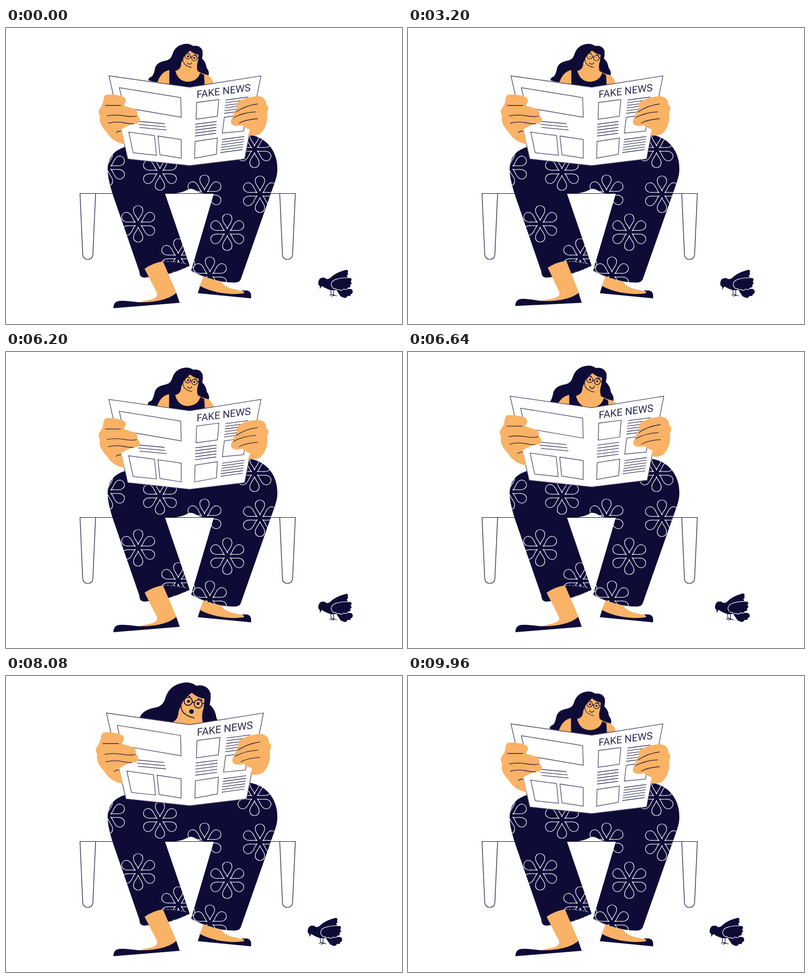
Write an HTML page that moves like this. It is 800 by 600 pixels and loops after 10000 ms.

```html
<!DOCTYPE html>
<html lang="en">
<head>
<meta charset="utf-8">
<title>Reading the paper</title>
<style>
  html, body { margin: 0; width: 100%; height: 100%; overflow: hidden; background: #fff; }
  svg { display: block; width: 800px; height: 600px; }
  .navy { fill: #0e0b37; }
  .skin { fill: #f9b266; }
  .line { fill: none; stroke: #0e0b37; stroke-linecap: round; stroke-linejoin: round; }
  .sheet { fill: #fff; stroke: #4a4768; stroke-width: 1.3; }
  .petal { fill: none; stroke: #fff; stroke-width: 1.2; }
  text { font: 20.5px Roboto, "Liberation Sans", sans-serif; fill: #2b2850; }
</style>
</head>
<body>
<svg viewBox="0 0 800 600">
  <defs>
    <path id="pants" d="M245 240C215 247 204 267 205.500 290C206 305 211 322 215.500 337L269.500 494Q269 505 279 506L300 504C330 500 350 492 371 482L321 335H343Q358 333 366 328Q373 324 381 328Q391 335 402 335H420L374 492C400 506 432 516 461 516Q471 516 474 510L540.500 320C546 305 549 295 548 281C547 250 527 221 490 216L300 225Z"/>
    <clipPath id="cloth"><use href="#pants"/></clipPath>
    <g id="flower"></g>
  </defs>

  <!-- bench -->
  <path class="line" stroke-width="1.2" d="M149.500 335.500H584.500M149.500 335.500L155 459Q156 469 165 469Q175 469 175.500 459L181 335.500M553 335.500L558.500 459Q559 469 568.500 469Q578 469 579 459L584.500 335.500"/>

  <!-- upper body -->
  <g id="head">
    <path class="navy" d="M288 106Q286 102 295 98Q299 93 301 82Q304 69 323 66Q333 64 336 54Q342 33 365.500 32Q373 32.500 378 36.500Q392 34 397 46Q398 54 396 62Q404 69 405 80Q412 90 409 96L402 100L330 112Q298 110 288 106Z"/>
    <path class="skin" d="M304 116C309 97 318 87 331 85L341 87Q354 85 354 71L358 62Q361 53 372 46Q380 53 389 54L388 66Q384 77 387 87Q396 93 407 95Q416 99 421 116Z"/>
    <path class="navy" d="M330 84L341 82Q346 109 368 109Q388 107 392 91L400 95L402 125H330Z"/>
    <path class="line" stroke-width="1.1" d="M357.500 63Q357 76 375 80M362 51Q366 48.500 370 51.500M380 54Q384 54 386 56.500"/>
    <g class="line" stroke-width="1.2">
      <circle cx="367" cy="57.5" r="5.5"/>
      <circle cx="380.5" cy="61" r="5.5"/>
      <path d="M372.400 59Q374 58 375.200 59.800M361.600 56L358 54M386 61L388.500 60"/>
    </g>
    <g id="eyes" class="navy"><circle cx="367.5" cy="57.5" r="1.9"/><circle cx="380.3" cy="60.6" r="1.9"/></g>
    <path id="mouth" class="line" stroke-width="1.3"/>
  </g>

  <!-- legs -->
  <use href="#pants" class="navy"/>
  <g id="flowers" clip-path="url(#cloth)"></g>
  <path d="M318 473Q343 473 367 479L369 482Q350 492 314 500Z" class="navy"/>
  <path d="M318 473Q343 473 367 479" fill="none" stroke="#fff" stroke-width=".8" stroke-dasharray="4 3"/>
  <g id="foot">
    <path class="skin" d="M280 488Q297 476 317 473L345 538L330 553L262 557L294 550Q308 546 305 537Z"/>
    <path class="navy" d="M217 568Q217 553 232 553C248 553 258 555 270 556C300 556 328 551 344 537L351 557Z"/>
  </g>
  <path class="skin" d="M399 503Q415 511 435 514Q439 523 455 528L484 535L470 541L420 539L391 524Z"/>
  <path class="navy" d="M392 523L387.500 537.500L495 548Q497 533 486 532H475Q482 534 481 537C470 541 425 541 392 523Z"/>

  <!-- newspaper and hands -->
  <g id="paper">
    <path class="sheet" d="M208 97L371 120L515 97L482 265.500L371 279L246 265.500Z"/>
    <g class="sheet">
      <path d="M229 121L353 141L354 181L238 161Z"/>
      <path d="M248 211L300 218L304 258L257 253Z"/>
      <path d="M307 219L354 226V264L311 257Z"/>
      <path d="M385 151L430 145L427 179L384 185Z"/>
      <path d="M441 181L485 175L480 209L437 213Z"/>
      <path d="M382 230L427 223L425 256L381 264Z"/>
    </g>
    <g id="print" class="line" stroke-width="1.3" opacity=".8"></g>
    <text transform="translate(385 142) skewY(-7.5)">FAKE NEWS</text>
    <path class="skin" d="M203 135Q220 134 235 139Q243 141 242 149Q241 155 234 156L260 164Q267 167 265 177Q271 181 270 188Q268 195 259 194Q243 198 233 206L240 236Q215 231 204 212Q186 193 190 179Q185 168 189 164Q196 155 197 145Q198 136 203 135Z"/>
    <path class="skin" d="M508 138Q485 140 470 149Q463 155 467 164Q458 170 460 180Q452 186 455 194Q460 201 477 197Q484 203 493 206L489 217Q505 221 515 213Q527 201 528 180Q526 175 530 164Q530 159 526 155Q525 139 508 138Z"/>
    <path class="line" stroke-width="1.3" opacity=".85" d="M201 157H232M205 178Q220 175 239 178T264 178M207 193Q222 189 238 192T258 194M223 212Q226 209 232 209M465 170Q484 157 508 154M459 182Q480 171 504 170M471 193Q482 186 508 184"/>
  </g>

  <!-- bird -->
  <g id="bird">
    <path class="line" stroke-width="1.2" d="M656 530L657 541M662 530V543M654 542L659 540L664 542M658 544L662 541L668 543"/>
    <path id="tail" class="navy" d="M664 526L682 528L697 529Q702 532 700 537Q698 540 696 540Q698 544 690 543Q688 548 683 547L676 544Z"/>
    <path id="beak" class="navy" d="M646 507Q633 503 631 515Q630 521 634 523L634 529L638 523L650 527Z"/>
    <path class="navy" d="M640 507Q648 511 655 507L675 512L680 528Q664 533 655 531Q645 528 637 522Z"/>
    <g id="wing" class="navy">
      <path d="M652 510Q663 496 688 490Q693 492 690 496Q693 499 688 502Q693 505 686 508L665 522Z"/>
      <path stroke="#fff" stroke-width="1.2" d="M657 521C656 510 671 506 696 506Q701 509 697 514Q701 518 696 521Q698 527 691 527Q689 532 682 529Q678 534 673 530Q668 532 666 528Q660 530 657 521Z"/>
    </g>
  </g>
</svg>
<script>
const LOOP = 10000;
const $ = id => document.getElementById(id);
const clamp = u => Math.min(1, Math.max(0, u));
const ease = (t, start, len) => { const u = clamp((t - start) / len); return u * u * (3 - 2 * u); };
const pulse = (t, start, len) => Math.sin(Math.PI * clamp((t - start) / len));
const pulses = (t, starts, len) => starts.reduce((sum, s) => sum + pulse(t, s, len), 0);
const move = (id, value) => $(id).setAttribute('transform', value);
const scaleAt = (x, y, sx, sy = sx) => `translate(${x} ${y}) scale(${sx} ${sy}) translate(${-x} ${-y})`;

// trouser pattern
const petal = 'M0-6C-1-14-9.500-18-9.500-27.500C-9.500-33.500-5-37-0-37C5-37 9.500-33.500 9.500-27.500C9.500-18 1-14 0-6';
$('flower').innerHTML = [0, 60, 120, 180, 240, 300]
  .map(a => `<path class="petal" d="${petal}" transform="rotate(${a})"/>`).join('');
$('flowers').innerHTML = [[206, 283], [311, 292], [401, 335], [502, 246], [513, 337],
  [267, 397], [447, 414], [348, 464], [412, 501]]
  .map(([x, y]) => `<use href="#flower" x="${x}" y="${y}"/>`).join('');

// columns of text: x, y, width, rise, rows, row step, x drift
$('print').innerHTML = [[266, 189, 54, 5, 3, 6.3, 2], [444, 146, 45, -6, 6, 5.4, -.6],
  [383, 195, 42, -5.5, 5, 6, -.2], [437, 226, 44, -6, 6, 5.3, -.7]]
  .map(([x, y, w, rise, rows, step, drift]) => Array.from({ length: rows }, (_, i) =>
    `<path d="M${x + i * drift} ${y + i * step}l${w} ${rise}"/>`).join('')).join('');

function drawMouth(p) {
  const r = 4.2 - 1.8 * p, half = (85 + 94 * p) * Math.PI / 180, mid = Math.PI / 2 - .3 * p;
  const at = a => `${371 + .5 * p + r * Math.cos(a)} ${70 + 1.3 * p + r * Math.sin(a) * (.75 + .25 * p)}`;
  const pts = Array.from({ length: 25 }, (_, i) => at(mid + half * (1 - i / 12)));
  $('mouth').setAttribute('d', 'M' + pts.join('L'));
  $('mouth').style.fill = p > .8 ? '#0e0b37' : 'none';
}

const FLAPS = [0, 960, 1840, 2680, 5280], HOPS = [6300, 6800], TAPS = [3040, 3720, 4400];

function draw(t) {
  const zoom = ease(t, 6000, 2000) - ease(t, 8200, 2000);
  move('head', scaleAt(365, 70, 1 + .5 * zoom));
  drawMouth(zoom);

  const lift = ease(t, 6000, 1650) - ease(t, 8300, 1650);
  move('paper', `translate(0 ${-22 * lift}) ` + scaleAt(361.5, 97, 1 + .033 * lift));

  const tap = pulses(t, TAPS, 280);
  move('foot', `rotate(${2 * tap} 350 557)`);
  move('eyes', scaleAt(374, 59, 1, 1 - .8 * tap));
  move('beak', `rotate(${-5 * tap} 652 517)`);

  const hop = pulses(t, HOPS, 360);
  const flap = pulses(t, FLAPS, 360) + hop;
  const walked = HOPS.reduce((sum, s) => sum + ease(t, s, 360), 0);
  move('bird', `translate(${-10.7 * walked} ${-hop})`);
  move('wing', `rotate(${-6 * flap} 658 516)`);
  move('tail', `translate(${2 * flap} ${flap})`);
}

function frame() {
  draw(Math.floor(performance.now() % LOOP / 40) * 40);
  requestAnimationFrame(frame);
}
frame();
</script>
</body>
</html>
```
